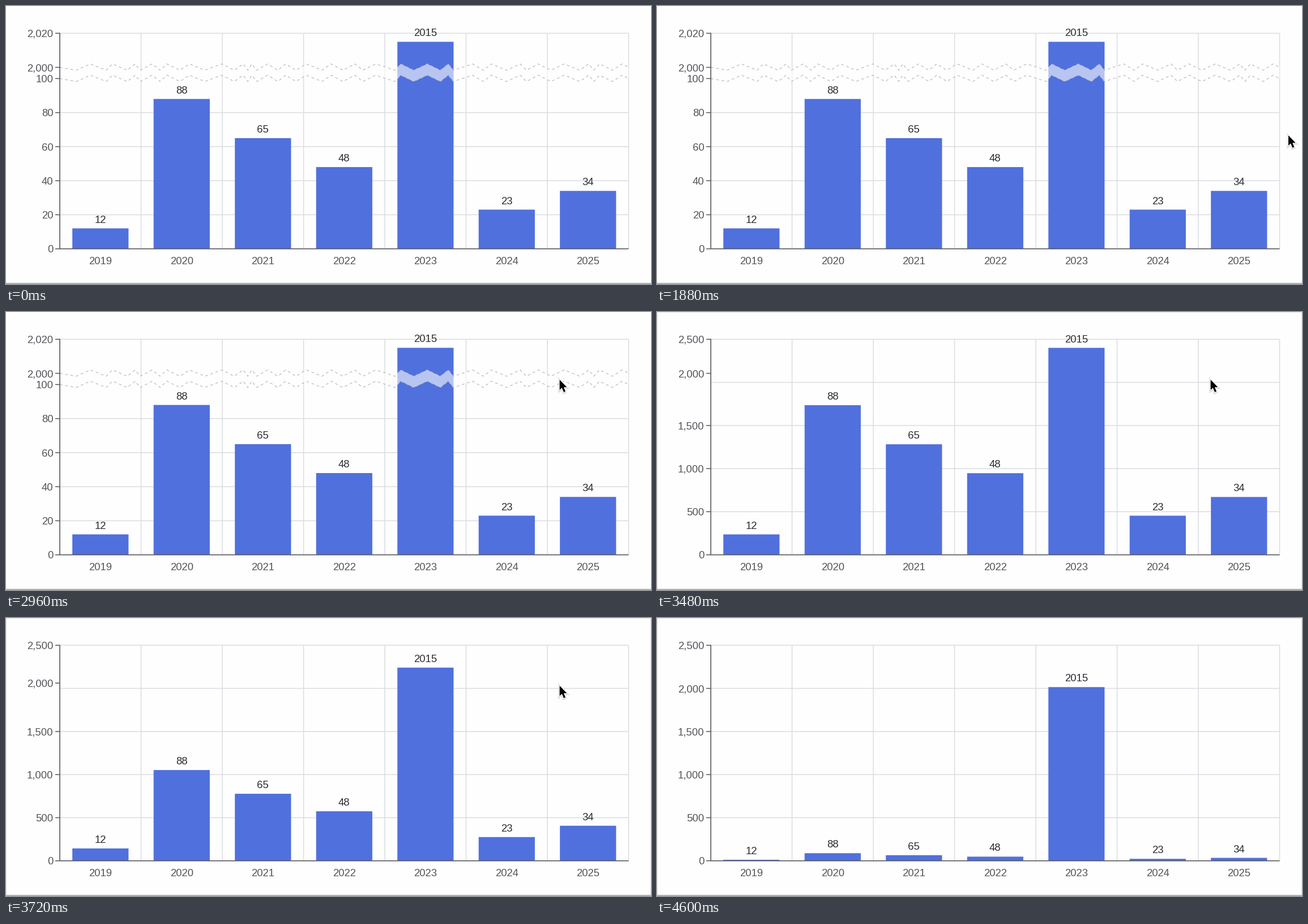
A matplotlib script that plays this animation: 1139x492 px, repeating every 4850 ms.

```python
import numpy as np
import matplotlib.pyplot as plt
from matplotlib.animation import FuncAnimation
from matplotlib.patches import Polygon, Rectangle

W, H, DPI = 1139, 492, 72          # at 72 dpi one point is one pixel
LOOP, INTERVAL, STEP = 4850, 25, 40
LEFT, RIGHT, TOP, BOTTOM = 95, 1099.5, 48.3, 429.7
SPAN = BOTTOM - TOP
GAP = 0.052 * SPAN
UNIT = (SPAN - GAP) / 120
SLOT = (RIGHT - LEFT) / 7
BAR_HALF = 49.6

YEARS = range(2019, 2026)
VALUES = [12, 88, 65, 48, 2015, 23, 34]
BLUE, GRID, AXIS, DASH = "#5070dd", "#dbdce0", "#54555a", "#b7b9be"

EXPAND, GROW_START, GROW_TIME = 3480, 3445, 500
CURSOR_IN, CURSOR_OUT = 1880, 4600

plt.rcParams["font.family"] = "Liberation Sans"
fig = plt.figure(figsize=((W + 0.01) / DPI, (H + 0.01) / DPI), dpi=DPI,
                 facecolor="#fefefe")
ax = fig.add_axes([0, 0, 1, 1])
ax.set_xlim(0, W)
ax.set_ylim(H, 0)
ax.axis("off")


def broken_y(v):
    """Height on the axis with 100..2000 folded into a small gap."""
    return BOTTOM - v * UNIT if v <= 100 else BOTTOM - 100 * UNIT - GAP - (v - 2000) * UNIT


def linear_y(v):
    return BOTTOM - v / 2500 * SPAN


def line(xs, ys, color, z, width=1.5, **kw):
    return ax.plot(xs, ys, color=color, lw=width, zorder=z, snap=False,
                   solid_capstyle="butt", **kw)[0]


def label(x, y, text, color, ha="center"):
    return ax.text(x, y + 6.6, text, color=color, ha=ha, va="baseline",
                   fontsize=18.5, zorder=8)


def y_scale(values, to_y, hidden_lines=()):
    """Grid lines, ticks and labels; returns the parts keyed by value."""
    parts = {}
    for v in values:
        y = to_y(v)
        parts[v] = [line([LEFT - 8, LEFT], [y, y], AXIS, 6),
                    label(83.5, y, f"{v:,}", AXIS, "right")]
        if v and v not in hidden_lines:
            parts[v].append(line([LEFT, RIGHT], [y, y], GRID, 1))
    return parts


broken = y_scale([0, 20, 40, 60, 80, 100, 2000, 2020], broken_y, (100, 2000))
linear = y_scale(range(0, 2501, 500), linear_y)

for i in range(1, 8):
    x = LEFT + i * SLOT
    line([x, x], [TOP, BOTTOM], GRID, 1)
line([LEFT, LEFT], [TOP - 0.7, BOTTOM], AXIS, 6, 1.6)
line([LEFT, RIGHT], [BOTTOM, BOTTOM], AXIS, 6, 1.6)
line([0, W], [490.9, 490.9], "#999999", 9)
border = line([0.5, 0.5, W - 0.5, W - 0.5], [490, 0.5, 0.5, 490], "#e4e4e6", 9, 1)

centers = [LEFT + (i + 0.5) * SLOT for i in range(7)]
bars, bar_labels = [], []
for x, year, value in zip(centers, YEARS, VALUES):
    label(x, 450.7, str(year), AXIS)
    bars.append(ax.add_patch(Rectangle((x - BAR_HALF, BOTTOM), 2 * BAR_HALF, 0,
                                       fc=BLUE, lw=0, zorder=3, snap=False)))
    bar_labels.append(label(x, 0, str(value), "#2b2c30"))

# Torn strip: alternating troughs and peaks
tear_x = np.array([
    95, 124, 149, 177, 188, 214, 228, 237, 258, 272, 284, 307, 324, 351, 381,
    403, 419, 427, 434, 443, 462, 480, 494, 512, 530, 558, 574, 595, 616, 630,
    653, 687, 697, 720, 744, 767, 781, 790, 824, 843, 857, 884, 908, 919, 940,
    962, 986, 1013, 1029, 1038, 1048, 1071, 1088, RIGHT])
tear_y = np.where(np.arange(len(tear_x)) % 2, 113.7, 102.5)
tear_y[[0, -1]] = 108.5
shift = GAP + 0.1
torn = [ax.add_patch(Polygon(
    np.r_[np.c_[tear_x, tear_y], np.c_[tear_x, tear_y + shift][::-1]],
    fc="white", alpha=0.6, lw=0, zorder=4))]
torn += [line(tear_x, tear_y + dy, DASH, 5, 1.2, ls=(0, (4, 4)), dash_capstyle="butt")
         for dy in (0, shift)]

ARROW = np.array([(0, 0), (0, 18.2), (4.1, 14.4), (7.3, 22), (10.4, 20.7),
                  (7.3, 13.3), (12.8, 13.3)])
cursor = []
for width in (5, 3.5, 2):
    cursor.append((ax.add_patch(Polygon(ARROW, fc="black", ec="black", lw=width,
                                        alpha=0.07, zorder=10)), (0.4, 1.8)))
cursor.append((ax.add_patch(Polygon(ARROW, fc="black", ec="white", lw=2.6,
                                    joinstyle="round", zorder=11)), (0.6, 0.8)))
cursor.append((ax.add_patch(Polygon(ARROW, fc="black", lw=0, zorder=12)), (0.6, 0.8)))


def cubic_in_out(p):
    return 4 * p ** 3 if p < 0.5 else 1 - 4 * (1 - p) ** 3


def ease_out(p):
    return 1 - (1 - p) ** 2.4


def smooth(p):
    return p * p * (3 - 2 * p)


MOVES = [  # start, end, from, to, easing
    (1840, 2320, (1142, 236), (995, 194), ease_out),
    (2480, 2960, (995, 194), (977, 119), smooth),
    (4360, 4600, (977, 119), (1142, 150), lambda p: p ** 1.7),
]


def progress(t, start, duration):
    return min(max((t - start) / duration, 0), 1)


def cursor_at(t):
    start, end, a, b, ease = [m for m in MOVES if t >= m[0]][-1]
    p = ease(progress(t, start, end - start))
    return np.array(a) + p * (np.array(b) - np.array(a))


def show(artists, visible):
    for artist in artists:
        artist.set_visible(visible)


def update(k):
    t = (k * INTERVAL + 15) // STEP * STEP
    expanded = t >= EXPAND
    show(torn, not expanded)
    show([border], expanded)
    for scale, visible in ((broken, not expanded), (linear, expanded)):
        for parts in scale.values():
            show(parts, visible)

    grow = cubic_in_out(progress(t, GROW_START, GROW_TIME)) if expanded else 0

    def between(v):
        return broken_y(v) + grow * (linear_y(v) - broken_y(v))

    tick, text = linear[2000][:2]
    y = between(2000)
    tick.set_ydata([y, y])
    text.set_y(y + 6.6)

    for bar, text, value in zip(bars, bar_labels, VALUES):
        y = between(value)
        bar.set_y(y)
        bar.set_height(BOTTOM - y)
        text.set_y(y - 16.5 + 6.6)

    pointing = CURSOR_IN <= t < CURSOR_OUT
    for patch, offset in cursor:
        patch.set_visible(pointing)
        if pointing:
            patch.set_xy(ARROW + cursor_at(t) + offset)
    return []


anim = FuncAnimation(fig, update, frames=LOOP // INTERVAL, interval=INTERVAL,
                     repeat=True, repeat_delay=0, blit=False)
plt.show()
```
